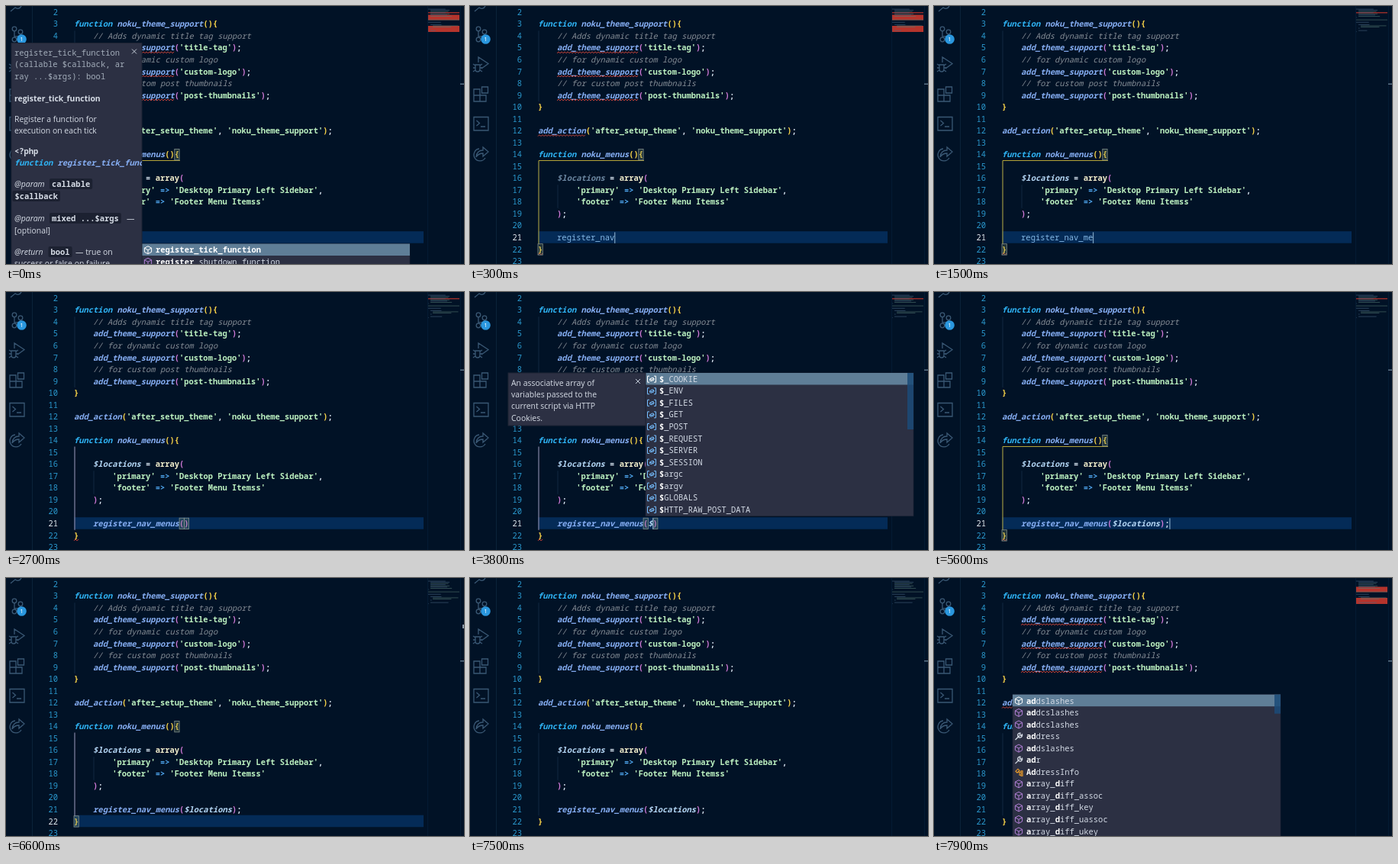
Animation of 600 by 338 pixels, one loop 8000 ms. Source, as an HTML page:

```html
<!DOCTYPE html>
<html lang="en">
<head>
<meta charset="utf-8">
<title>Code editor</title>
<style>
html, body { margin: 0; width: 100%; height: 100%; overflow: hidden; background: #011226; }
svg { display: block; width: 600px; height: 338px; }
text { font: 600 10.46px "Noto Sans Mono", "DejaVu Sans Mono", monospace; white-space: pre; }
.sans { font: 500 10.45px "Open Sans", "Noto Sans", sans-serif; }
.b { font-weight: 700; }
.thin { font-weight: 500; }
.i { font-style: italic; }
.icon { fill: none; stroke: #3a5874; stroke-width: 1.3; }
</style>
</head>
<body>
<svg id="stage" viewBox="0 0 600 338"></svg>
<script>
const LOOP = 8000, CW = 6.276, X0 = 89, PITCH = 15.53;
const lineY = n => 8.3 + (n - 2) * PITCH;
const colX = c => X0 + c * CW;

const CODE = {
  3: "function noku_theme_support(){",
  4: "    // Adds dynamic title tag support",
  5: "    add_theme_support('title-tag');",
  6: "    // for dynamic custom logo",
  7: "    add_theme_support('custom-logo');",
  8: "    // for custom post thumbnails",
  9: "    add_theme_support('post-thumbnails');",
  10: "}",
  12: "add_action('after_setup_theme', 'noku_theme_support');",
  14: "function noku_menus(){",
  16: "    $locations = array(",
  17: "        'primary' => 'Desktop Primary Left Sidebar',",
  18: "        'footer' => 'Footer Menu Itemss'",
  19: "    );",
  22: "}"
};

// Typed statement: [time, characters entered so far]
const TYPED = "register_nav_menus($locations);";
const KEYS = [[0, 9], [100, 10], [200, 11], [300, 12], [1100, 13], [1400, 14], [1500, 15],
  [1700, 16], [1900, 18], [2200, 19], [3500, 20], [4200, 21], [4300, 22], [4400, 23],
  [4500, 25], [4600, 26], [4700, 27], [4900, 28], [5000, 29], [5500, 30], [5600, 31]];

// Popup rows: icon letter, then parts alternating bold and plain
const GLOBALS = ["_COOKIE", "_ENV", "_FILES", "_GET", "_POST", "_REQUEST", "_SERVER",
  "_SESSION", "argc", "argv", "GLOBALS", "HTTP_RAW_POST_DATA"].map(s => "v$|" + s);
const ADD_ROWS = ["cad|dslashes", "cad|dcslashes", "cad|dcslashes", "wad|dress", "cad|dslashes",
  "wad|r", "oAd|dressInfo", "ca|rray_|d|iff", "ca|rray_|d|iff_assoc", "ca|rray_|d|iff_key",
  "ca|rray_|d|iff_uassoc", "ca|rray_|d|iff_ukey"];
const REGISTER_ROWS = ["cregister_tick_function", "cregister_|shutdown_function"];

const esc = s => s.replace(/&/g, "&amp;").replace(/</g, "&lt;").replace(/>/g, "&gt;");
const rect = (x, y, w, h, fill, more = "") =>
  `<rect x="${x}" y="${y}" width="${w}" height="${h}" fill="${fill}" ${more}/>`;
const path = (d, stroke, w = 1, more = "") =>
  `<path d="${d}" fill="none" stroke="${stroke}" stroke-width="${w}" ${more}/>`;
const text = (x, y, s, fill, cls = "") =>
  `<text x="${x}" y="${y + 3.6}" fill="${fill}" class="${cls}">${esc(s)}</text>`;

// Colour and class by token group
const TOKEN = /(\/\/.*)|('[^']*')|(function\b)|(\$\w*)|(array)|(\w+(?=\())|(=>)|([(){}])|(\w+)|([^])/g;
const STYLE = [
  ["#868d96", "i thin"], ["#bcf0c0"], ["#2fb4f5", "i"], ["#b4d6f4", "i"], ["#f1eccb"],
  ["#87aff4", "i"], ["#4fa6ee"], [], ["#86b9e6", "thin"], ["#dbe6f2"]
];

function codeLine(n, src, dim) {
  const indent = src.search(/\S/);
  const spans = [...src.trim().matchAll(TOKEN)].map(m => {
    const g = m.slice(1).findIndex(v => v !== undefined);
    const [fill = indent ? "#d27ad8" : "#ffd94a", cls = ""] = STYLE[g];
    const fade = dim && g === 3 ? ' fill-opacity=".6"' : "";
    return `<tspan fill="${fill}" class="${cls}"${fade}>${esc(m[0])}</tspan>`;
  }).join("");
  return `<text x="${colX(indent)}" y="${lineY(n) + 3.6}">${spans}</text>`;
}

function squiggle(n, col, len) {
  const y = lineY(n) + 7;
  let d = `M${colX(col)} ${y}`;
  for (let i = 1; i <= len * CW / 2; i++) d += `l2 ${i % 2 ? -2 : 2}`;
  return path(d, "#e04a3c", .9);
}

const bracketBox = (n, col) =>
  rect(colX(col), lineY(n) - 7.2, CW, 14.4, "#7d8f6c", 'fill-opacity=".25" stroke="#83908a" stroke-width=".8"');

function rowIcon(kind, x, y, on) {
  const at = `transform="translate(${x} ${y})"`;
  if (kind === "c") return path("M0-5L4.6-2.6V2.6L0 5L-4.6 2.6V-2.6ZM-4.6-2.6L0 0L4.6-2.6M0 0V5", on ? "#fff" : "#b180d7", 1, at);
  if (kind === "v") return path("M-3-4H-5.5V4H-3M3-4H5.5V4H3M-2.5 0L1-2L3-1V1L-1 2.5L-2.5 1.5ZM-2.5 0L0 1L3-1", on ? "#fff" : "#75beff", 1, at);
  if (kind === "w") return path("M-4.5 4.5L1-1M4.5-2.5A3 3 0 1 1 2-4.5L1.5-2L3-1Z", "#d5dbe5", 1.3, at);
  return path("M-4-1L-1-4L1-2L-2 1ZM-1 0H3M1 0V4H3M3-1.5H5V1H3ZM3 2.5H5V5H3Z", "#ee9d28", 1.1, at);
}

function popup(x, y, rows, thumb) {
  let out = rect(x, y, 351, rows.length * 15.55 + 1, "#2c3043", 'stroke="#1f2434" stroke-width=".6"') +
    rect(x, y, 351, 15.5, "#5f7e97");
  rows.forEach((row, i) => {
    const cy = y + 8.2 + i * 15.55;
    const parts = row.slice(1).split("|").map((p, k) =>
      `<tspan class="${k % 2 ? "thin" : "b"}" fill="${k % 2 ? "#d3dae5" : "#fff"}">${esc(p)}</tspan>`).join("");
    out += rowIcon(row[0], x + 8, cy, !i) + `<text x="${x + 18}" y="${cy + 3.6}">${parts}</text>`;
  });
  return out + (thumb ? rect(x + 343, y, 8, thumb, "#1b4a78", 'opacity=".85"') : "");
}

const panel = (x, y, w, h) => rect(x, y, w, h, "#2c3043", 'stroke="#1f2434"') +
  path(`M${x + w - 13} ${y + 8}l6 6m0-6l-6 6`, "#c3ccd8");

function cookieDetail() {
  const lines = ["An associative array of", "variables passed to the", "current script via HTTP", "Cookies."];
  return panel(50, 106, 180, 69) +
    lines.map((s, i) => text(54, 119 + i * 15.3, s, "#d6dce6", "sans")).join("");
}

function tickDetail() {
  const light = "#d6dce6", grey = "#a3adba";
  const sans = (x, y, s, cls = "") => text(x, y, s, light, "sans " + cls);
  const chip = (x, y, s) => rect(x - 3, y - 7, s.length * CW + 6, 14, "#1c2131", 'rx="2"') + text(x, y, s, light);
  return `<clipPath id="pane"><rect x="7" y="48" width="171" height="290"/></clipPath>` +
    panel(7, 48.5, 171, 295) + `<g clip-path="url(#pane)">` +
    text(11, 61, "register_tick_function", grey, "thin") + text(11, 76.5, "(callable $callback, ar", grey, "thin") +
    text(11, 92, "ray ...$args): bool", grey, "thin") +
    sans(11, 121, "register_tick_function", "b") +
    sans(11, 148, "Register a function for") + sans(11, 163, "execution on each tick") +
    text(11, 190, "<?php", light) + text(11, 205.5, "function", "#2fb4f5", "i") +
    text(11 + 9 * CW, 205.5, "register_tick_function", "#87aff4", "i") +
    sans(11, 233, "@param", "i") + chip(60, 233, "callable") + chip(11.5, 249, "$callback") +
    sans(11, 278, "@param", "i") + chip(60, 278, "mixed ...$args") + sans(158, 278, "—") +
    sans(11, 294, "[optional]") +
    sans(11, 322, "@return", "i") + chip(58.5, 322, "bool") + sans(91, 322, "— true on") +
    sans(11, 337.5, "success or false on failure") + "</g>";
}

const SIDEBAR = path("M34.5 0V338", "#0a2239") +
  `<g class="icon"><path d="M6 7L12 2A5 5 0 0 0 20 0"/>
  <circle cx="11" cy="30" r="2.8"/><circle cx="11" cy="44" r="2.8"/><circle cx="19" cy="34" r="2.8"/>
  <path d="M11 33V41M19 37Q19 40 11 40"/>
  <path d="M11 74V67L24 75.5L15 82M7 77H13V83A3 3 0 0 1 7 83ZM4 76L7 78M4 81H7M4 86L7 84M16 76L13 78M16 81H13M16 86L13 84"/>
  <path d="M5 109H13V125H5ZM5 117H21V125H13M21 117V125M15.5 106H23.5V114H15.5Z"/>
  <path d="M5 145.5H24V163H5ZM8.5 150L12.5 153.5L8.5 157M14 158H20"/>
  <path d="M12 187A8 8 0 1 0 20 199M8 198Q9 189 17 189V185L24 191L17 197V193Q11 193 8 198"/></g>` +
  `<circle cx="20.5" cy="43.5" r="6.3" fill="#2a97de"/>` +
  `<text x="20.5" y="46.4" class="sans" style="font-size:8px" text-anchor="middle" fill="#fff">1</text>`;

function minimap(lines, errors, pending, line) {
  let out = path("M552.5 0V338M595.5 0V338", "#07203a", .7);
  if (pending) out += rect(553, 8.2, 41, 1.2, "#b8322c");
  if (errors) out += rect(553, 11.5, 41, 7, "#b5342c") + rect(553, 26, 41, 8, "#b5342c");
  for (const n in lines) {
    const s = lines[n], indent = s.search(/\S/);
    out += rect(553 + indent * .76, n * 1.56 - 1, (s.length - indent) * .76, .8, /'/.test(s) ? "#587a72" : "#486480", 'opacity=".7"');
  }
  if (line === 22) out += rect(598, 61, 2, 5, "#8c9aa8");
  return out + rect(595, line === 21 ? 101.5 : 108, 5, 1.5, "#5d7488");
}

function draw(t) {
  const count = KEYS.filter(k => k[0] <= t).pop()[1];
  const open = count >= 19 && count < 30;
  const current = t < 6600 ? 21 : t < 7100 ? 22 : t < 7500 ? 23 : 24;
  const errors = t < 900 || t >= 7800, pending = t < 6200;
  const scope = t < 2200 || (t >= 5600 && t < 6600);
  const lines = { ...CODE, 21: "    " + TYPED.slice(0, count) + (open ? ")" : "") };

  let out = SIDEBAR + rect(89, lineY(current) - 8.2, 458, PITCH, "#042b57");
  out += path(`M90 ${lineY(4) - 7}V${lineY(9) + 8}M90 ${lineY(15) - 7}V${lineY(21) + 8}M115 ${lineY(17) - 7}V${lineY(18) + 8}`, "#17304a", .8);
  if (scope) out += path(`M228 202.5H90V${lineY(22) - 7}`, "#c9b43c", .9);
  else if (t < 6900) out += path(`M90 202.5V${lineY(22) - 7}`, "#a99fc0", .9);

  for (let n = 2; n <= 23; n++) {
    const s = String(n);
    out += text(68 - s.length * CW, lineY(n), s, n === current ? "#e3e8ee" : "#2a98cd", "thin");
    if (lines[n]) out += codeLine(n, lines[n], t < 900);
  }
  if (errors) out += [5, 7, 9].map(n => squiggle(n, 4, 17)).join("") + squiggle(12, 0, 10);
  if (pending) out += squiggle(22, 0, 1);
  if (scope || current === 22) out += bracketBox(14, 21) + bracketBox(22, 0);
  if (t >= 2700 && t < 5600) out += bracketBox(21, 22) + bracketBox(21, open ? count + 4 : 33);

  const caretOn = t < 6100 && !(t >= 2700 && t < 3200);
  if (caretOn) out += rect(colX(4 + count) - .3, lineY(21) - 7, 1.2, 14.5, "#80a4c2");
  if (current === 23) out += rect(X0, lineY(23) - 7, 1.2, 14.5, "#80a4c2");

  out += minimap(lines, errors, pending, current);

  if (t < 100) out += popup(178, 311.5, REGISTER_ROWS) + tickDetail();
  if (t >= 3500 && t < 4200) out += popup(230, 106, GLOBALS, 74);
  if (t >= 3700 && t < 4200) out += cookieDetail();
  if (t >= 4200 && t < 5500) {
    const row = "v" + TYPED.slice(19, count) + "|" + TYPED.slice(count, 29);
    out += popup(231, 311.5, [row, row]);
  }
  if (t >= 7800) out += popup(103, 152.7, ADD_ROWS, 25);
  return out;
}

const stage = document.getElementById("stage");
let shown = "";
function tick() {
  const next = draw(performance.now() % LOOP);
  if (next !== shown) stage.innerHTML = shown = next;
  requestAnimationFrame(tick);
}
tick();
</script>
</body>
</html>
```
